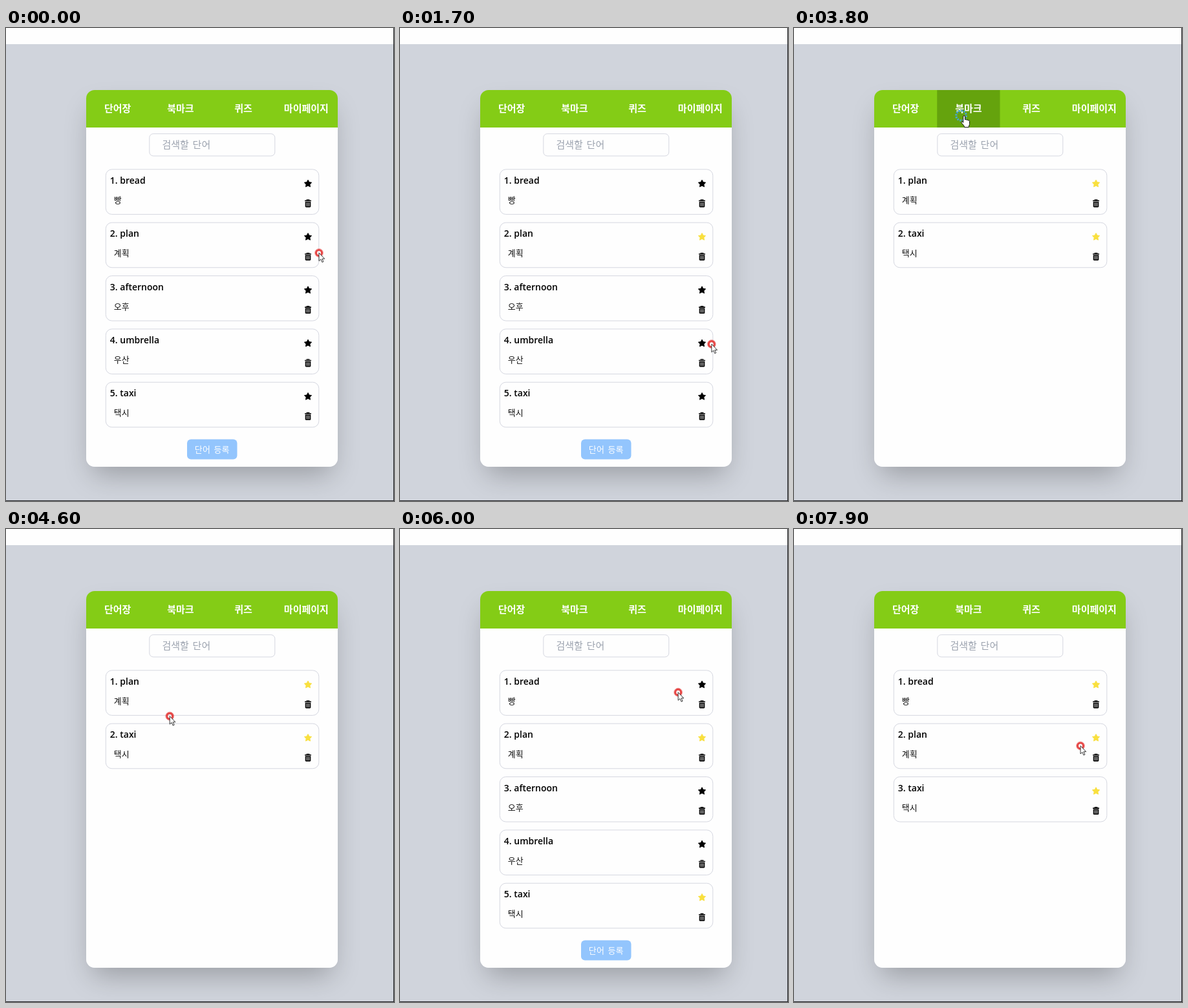
An HTML page for the animation above (8 s loop, 600 px wide and 732 px high).

```html
<!DOCTYPE html>
<html lang="ko">
<head>
<meta charset="utf-8">
<title>단어장</title>
<style>
  html, body { margin: 0; width: 100%; height: 100%; overflow: hidden; background: #d0d4dc; }
  #stage { position: relative; width: 600px; height: 732px; overflow: hidden; background: #d0d4dc; }
  #panel { position: absolute; left: 124px; top: 96px; width: 389px; height: 582.5px; border-radius: 13px;
    background: linear-gradient(#84cc16 58px, #fefefe 0); box-shadow: 0 21px 43px -10px rgba(0, 0, 0, .27); }
  svg { position: absolute; left: 0; top: 0; display: block; }
  text { font-family: "Noto Sans CJK KR", "Noto Sans CJK", sans-serif; }
  .tab { font-size: 15px; font-weight: 700; fill: #fff; text-anchor: middle; }
  .hint { font-size: 15px; fill: #9ca3af; word-spacing: 1.5px; }
  .word { font: 600 14px "Open Sans", "Noto Sans", sans-serif; fill: #000; }
  .mean { font-size: 13px; fill: #111; }
  .add { font-size: 13px; fill: #fff; text-anchor: middle; word-spacing: 1.5px; letter-spacing: .2px; }
  .box { fill: #fefefe; stroke: #d5d7e0; }
</style>
</head>
<body>
<div id="stage">
  <div id="panel"></div>
  <svg width="600" height="732" viewBox="0 0 600 732">
    <defs>
      <clipPath id="round"><rect x="124" y="96" width="389" height="582.5" rx="13"/></clipPath>
      <g id="trash">
        <path d="M-1.8 -4.6V-5.5H1.8V-4.6" fill="none" stroke="#000" stroke-width="1.2"/>
        <rect x="-5" y="-4.8" width="10" height="1.6" rx=".6"/>
        <path d="M-4.3 -2.5H4.3V4.6A1.4 1.4 0 0 1 2.9 6H-2.9A1.4 1.4 0 0 1 -4.3 4.6Z"/>
        <path d="M-2.1 -1.2V4.4M0 -1.2V4.4M2.1 -1.2V4.4" stroke="#fefefe" stroke-width=".8"/>
      </g>
    </defs>
    <rect width="600" height="25" fill="#fefefe"/>
    <g clip-path="url(#round)"><rect id="hover" y="96" width="97.25" height="58" fill="#65a30d"/></g>
    <g id="tabs"></g>
    <rect class="box" x="221.8" y="163.7" width="194" height="34.3" rx="6"/>
    <text class="hint" x="241.5" y="186.3">검색할 단어</text>
    <g id="cards"></g>
    <g id="add">
      <rect x="280" y="636.5" width="77.5" height="31" rx="6" fill="#93c5fd"/>
      <text class="add" x="318.8" y="656.8">단어 등록</text>
    </g>
    <path d="M599.5 0V732M0 731.5H600" stroke="#25262a"/>
    <g id="cursor">
      <g id="idle" fill="none" stroke="#e0201f">
        <circle r="4.5" stroke-width="3.2" opacity=".82"/>
        <circle r="6.5" opacity=".35"/>
      </g>
      <circle id="click" r="7.7" fill="none" stroke="#46a5d6" stroke-width="3.2" stroke-dasharray="2.4 1.6"/>
      <path id="arrow" d="M0 0V12.5L2.9 9.9L4.9 14.5L6.9 13.6L4.9 9.2H8.7Z" fill="#fff" stroke="#222" stroke-width=".9"/>
      <path id="hand" d="M3.2 1.5c0-1.8 2.8-1.8 2.8 0V6.5c.6-.8 2.2-.6 2.5.5c.7-.7 2.1-.4 2.3.7c.8-.6 2.2-.1 2.2 1.2V13c0 2-1.5 3-1.5 5.2H5.2C5 15.5 2 13.5.6 11.2C-.3 9.7 1.2 8.8 2.3 9.8L3.2 10.8Z" fill="#fff" stroke="#111"/>
    </g>
  </svg>
</div>
<script>
const LOOP = 8000, STEP = 100, LEFT = 124, TAB_W = 97.25;
const $ = id => document.getElementById(id);
const show = (id, on) => $(id).setAttribute('visibility', on ? 'visible' : 'hidden');

const tabs = ['단어장', '북마크', '퀴즈', '마이페이지'];

// The pointer rests at each stop around its click and swings there by `bow` pixels sideways.
const stops = [
  { click: -200, x: 484, y: 348 },
  { click: 1000, x: 463.5, y: 322, bow: 0, star: 'plan' },
  { click: 2700, x: 464, y: 572, bow: -20, star: 'taxi' },
  { click: 3800, x: 258.5, y: 135.5, bow: 20, tab: 1 },
  { click: 5400, x: 209, y: 147, bow: -150, tab: 0 },
  { click: 6400, x: 470, y: 240, bow: 26, star: 'bread' },
  { click: 7100, x: 272, y: 132, bow: 10, tab: 1 },
  { click: 8000, x: 443, y: 335.5, bow: 190 }
];

const words = [
  ['bread', '빵'], ['plan', '계획'], ['afternoon', '오후'], ['umbrella', '우산'], ['taxi', '택시']
];

function pointer(t) {
  const i = stops.findIndex(s => t < s.click + 200);
  const b = stops[i], a = stops[i - 1];
  const start = a.click + 200, end = b.click - 100;
  const u = Math.min(1, (t - start) / (end - start));
  const ease = 1 - (1 - u) ** 2.5;
  const dx = b.x - a.x, dy = b.y - a.y;
  const side = b.bow * Math.sin(Math.PI * u) / Math.hypot(dx, dy);
  return [a.x + dx * ease - dy * side, a.y + dy * ease + dx * side];
}

const star = Array.from({ length: 10 }, (_, i) => {
  const r = i % 2 ? 3 : 5.9, a = (i / 5 - .5) * Math.PI;
  return (r * Math.cos(a)).toFixed(2) + ',' + (r * Math.sin(a)).toFixed(2);
}).join(' ');

const cardY = i => 218.8 + 82.35 * i;

function card([word, mean], i, marked) {
  const color = marked ? '#f9e03e' : '#000';
  return `<g transform="translate(154 ${cardY(i)})">
    <rect class="box" x=".3" width="329.5" height="69.6" rx="9.5"/>
    <text class="word" x="6.8" y="22.2">${i + 1}. ${word}</text>
    <text class="mean" x="12.8" y="52.2">${mean}</text>
    <polygon points="${star}" transform="translate(313 22.2)" fill="${color}" stroke="${color}" stroke-linejoin="round"/>
    <use href="#trash" x="313" y="52.6"/></g>`;
}

$('tabs').innerHTML = tabs.map((s, i) =>
  `<text class="tab" x="${LEFT + TAB_W * (i + .5)}" y="130.3">${s}</text>`).join('');

let last = '';

function draw(now) {
  const t = Math.floor(now % LOOP / STEP) * STEP;
  const done = stops.filter(s => s.click <= t);
  const page = done.reduce((p, s) => s.tab ?? p, 0);
  const marked = ([word]) => done.some(s => s.star === word);
  const list = page ? words.filter(marked) : words;
  const html = list.map((w, i) => card(w, i, marked(w))).join('');
  if (html !== last) $('cards').innerHTML = last = html;
  show('add', !page);

  const [x, y] = pointer(t);
  const onTab = y >= 96 && y < 154 && x >= LEFT && x < 513;
  const onIcon = Math.abs(x - 467) < 7 && list.some((_, i) =>
    [22, 53].some(dy => Math.abs(y - cardY(i) - dy) < 7));
  const hit = stops.some(s => s.click === t);
  show('hover', onTab);
  $('hover').setAttribute('x', LEFT + TAB_W * Math.floor((x - LEFT) / TAB_W));
  $('cursor').setAttribute('transform', `translate(${x.toFixed(2)} ${y.toFixed(2)})`);
  show('hand', onTab || onIcon);
  show('arrow', !(onTab || onIcon));
  show('click', hit);
  show('idle', !hit);
}

function tick() {
  draw(performance.now());
  requestAnimationFrame(tick);
}
tick();
</script>
</body>
</html>
```
